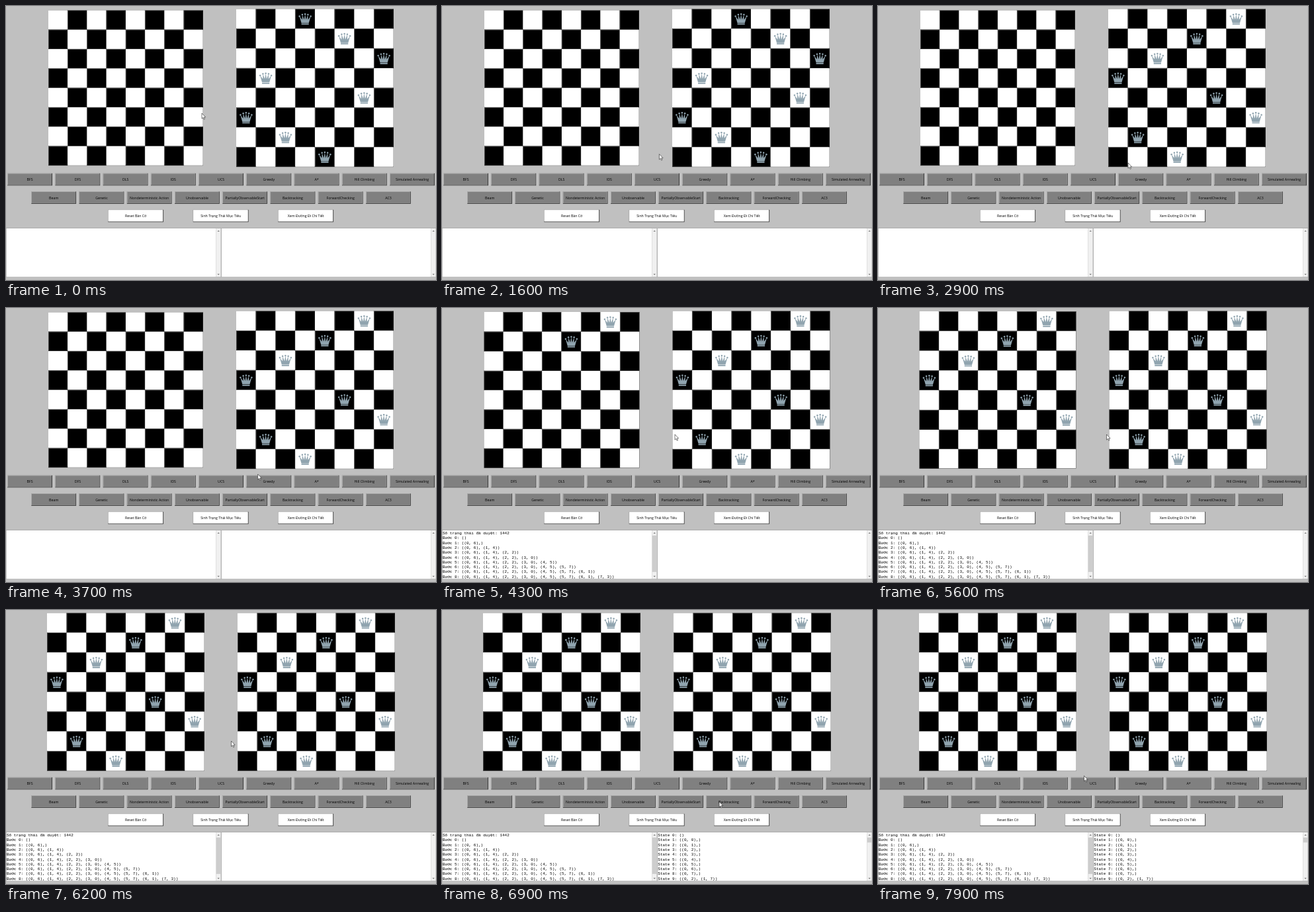
Write an HTML page that moves like this. It is 650 px wide and 414 px high and loops after 8 s.

```html
<!DOCTYPE html>
<html lang="vi">
<head>
<meta charset="utf-8">
<style>
  html, body { margin: 0; width: 100%; height: 100%; overflow: hidden; background: #c0c0c0; }
  svg { display: block; width: 650px; height: 414px; }
  .ui { font: 5.25px "Open Sans", "Noto Sans", sans-serif; text-anchor: middle; }
  .log { font: 6px "Liberation Mono", "DejaVu Sans Mono", monospace; white-space: pre; }
</style>
</head>
<body>
<svg viewBox="0 0 650 414">
  <defs><g id="queen" fill="#90a4af"></g></defs>
  <rect width="650" height="414" fill="#c0c0c0"/>
  <g id="ui"></g>
  <g id="boards"></g>
  <g id="logs"></g>
  <path id="cursor" d="M0 0V8.2L1.9 6.5L3.2 9.4L4.5 8.8L3.2 6H5.7Z" fill="#fff" stroke="#222" stroke-width=".6"/>
</svg>
<script>
const LOOP = 8000, STEP = 100;
const GOAL_AT = 2500, RUN_AT = 3800, QUEEN_AT = 3900, QUEEN_GAP = 320, DETAIL_AT = 6700;
const START = [3, 5, 7, 1, 6, 0, 2, 4];
const GOAL = [6, 4, 2, 0, 5, 7, 1, 3];

// pointer moves: end time, duration, x, y
const HOME = [296, 162];
const MOVES = [
  [200, 200, 298, 187], [600, 200, 320, 187], [1300, 400, 325, 211],
  [2300, 900, 352, 312], [2900, 500, 378, 237], [3300, 400, 384, 258],
  [4100, 500, 352, 191], [4900, 600, 345.5, 191], [6200, 400, 340.5, 198],
  [6600, 400, 446, 315], [7300, 600, 342, 217], [7900, 200, 311.5, 250.5]
];

const $ = id => document.getElementById(id);
const range = n => [...Array(n).keys()];
const clamp = k => Math.max(0, Math.min(1, k));
const rect = (x, y, w, h, fill) =>
  `<rect x="${x}" y="${y}" width="${w}" height="${h}" fill="${fill}"/>`;

function queen() {
  const tips = range(5).map(i => [(i - 2) * 4.25, .8 * (i - 2) ** 2 - 7.2]);
  const spikes = tips.map(([x, y], i) =>
    `L${x} ${y}` + (i < 4 ? `L${(i - 1.5) * 2.9} 1.2` : "")).join("");
  return `<path d="M-5.6 6.2${spikes}L5.6 6.2Z"/>` +
    tips.map(([x, y]) => `<circle cx="${x}" cy="${y - .2}" r="1.25"/>`).join("") +
    rect(-5.6, 6.8, 11.2, 1.8, "#90a4af");
}

function button(x, y, w, label, face) {
  const h = 18.5;
  return rect(x, y, w, h, "#3c3c3c") + rect(x, y, w - 1, h - 1, "#d4d4d4") +
    rect(x + .5, y + .5, w - 1.5, h - 1.5, face) +
    `<text class="ui" x="${x + w / 2}" y="${y + 11.2}">${label}</text>`;
}

const row = (labels, x, y, gap, w, face) =>
  labels.map((s, i) => button(x + i * gap, y, w, s, face)).join("");

function pane(x, w) {
  const c = x + w + 3.7;
  const arrow = (y, d) => `<path d="M${c - 1.7} ${y}l1.7 ${d}l1.7 ${-d}Z" fill="#707070"/>`;
  return rect(x, 335.3, w + 7.5, 74.5, "#a2a2a2") + rect(x + .6, 336, w - .6, 73.3, "#fff") +
    rect(x + w, 336, 7.2, 73.3, "#f0f0f0") + arrow(340.8, -1.7) + arrow(404.8, 1.7);
}

$("queen").innerHTML = queen();
$("ui").innerHTML =
  row(["BFS", "DFS", "DLS", "IDS", "UCS", "Greedy", "A*", "Hill Climbing", "Simulated Annealing"],
    2.2, 252.8, 72.25, 67.8, "#808080") +
  row(["Beam", "Genetic", "Nondeterministic Action", "Unobservable", "PartiallyObservableStart",
    "Backtracking", "ForwardChecking", "AC3"], 38.3, 280.4, 72.25, 67.8, "#808080") +
  row(["Reset Bàn Cờ", "Sinh Trạng Thái Mục Tiêu", "Xem Đường Đi Chi Tiết"],
    154.3, 307.9, 128.5, 83.8, "#fff") +
  pane(0, 317.5) + pane(325.3, 317.2);

// Rows and columns that hold a queen are half a pixel larger.
function edges(start, size, wide) {
  const out = [start];
  for (let i = 0; i < 8; i++) out.push(out[i] + size + (wide(i) ? .5 : 0));
  return out;
}

// Raised cell: light top and left edge, dark bottom and right edge.
function cell(x, y, w, h, dark) {
  const [light, face, shade] = dark ? ["#747474", "#000", "#000"] : ["#fff", "#fff", "#606060"];
  return rect(x, y, w, h, shade) + rect(x, y, w - .6, h - .6, light) +
    rect(x + .6, y + .6, w - 1.2, h - 1.2, face);
}

function board(x, queens) {
  const n = queens.length;
  const xs = edges(x, 29.25, i => queens.includes(i));
  const ys = edges(6.5 - n / 4, 29.33, i => i < n);
  let s = "";
  for (const r of range(8)) for (const c of range(8)) {
    const w = xs[c + 1] - xs[c], h = ys[r + 1] - ys[r];
    s += cell(xs[c], ys[r], w, h, (r + c) % 2);
    if (queens[r] === c)
      s += `<use href="#queen" x="${xs[c] + w / 2}" y="${ys[r] + h / 2 + .2}"/>`;
  }
  return s;
}

const lines = (x, list) => list.map((s, i) =>
  `<text class="log" x="${x}" y="${342 + i * 7.3}">${s}</text>`).join("");

const tuple = list => "(" + list.join(", ") + (list.length === 1 ? ",)" : ")");
const placed = GOAL.map((c, r) => `(${r}, ${c})`);
const steps = range(9).map(k => `Bước ${k}: ${tuple(placed.slice(0, k))}`);
const states = range(8).map(k => `State ${k + 1}: ${tuple([`(0, ${k})`])}`);

const stepLog = lines(1, ["Số trạng thái đã duyệt: 1442", ...steps]) +
  rect(317.8, 343.8, 6.7, 55, "#cdcdcd");
const stateLog = lines(326.3, ["State 0: ()", ...states, "State 9: ((0, 2), (1, 7))"]) +
  rect(642.8, 343.8, 6.7, 7.5, "#cdcdcd");

function pointer(t) {
  let [x, y] = HOME;
  for (const [end, span, tx, ty] of MOVES) {
    const k = clamp((t - end + span) / span), e = k * k * (3 - 2 * k);
    x += (tx - x) * e;
    y += (ty - y) * e;
  }
  return [x, y];
}

let shown = "";
function draw(t) {
  const n = Math.max(0, Math.min(8, Math.floor((t - QUEEN_AT) / QUEEN_GAP) + 1));
  const goal = t >= GOAL_AT, run = t >= RUN_AT, detail = t >= DETAIL_AT;
  const key = [n, goal, run, detail].join();
  if (key !== shown) {
    shown = key;
    $("boards").innerHTML = board(64 - n / 4, GOAL.slice(0, n)) +
      board(348 + n / 4, goal ? GOAL : START);
    $("logs").innerHTML = (run ? stepLog : "") + (detail ? stateLog : "");
  }
  $("cursor").setAttribute("transform", `translate(${pointer(t)})`);
}

const begin = performance.now();
function tick() {
  const t = (performance.now() - begin) % LOOP;
  draw(Math.floor(t / STEP) * STEP);
  requestAnimationFrame(tick);
}
tick();
</script>
</body>
</html>
```
